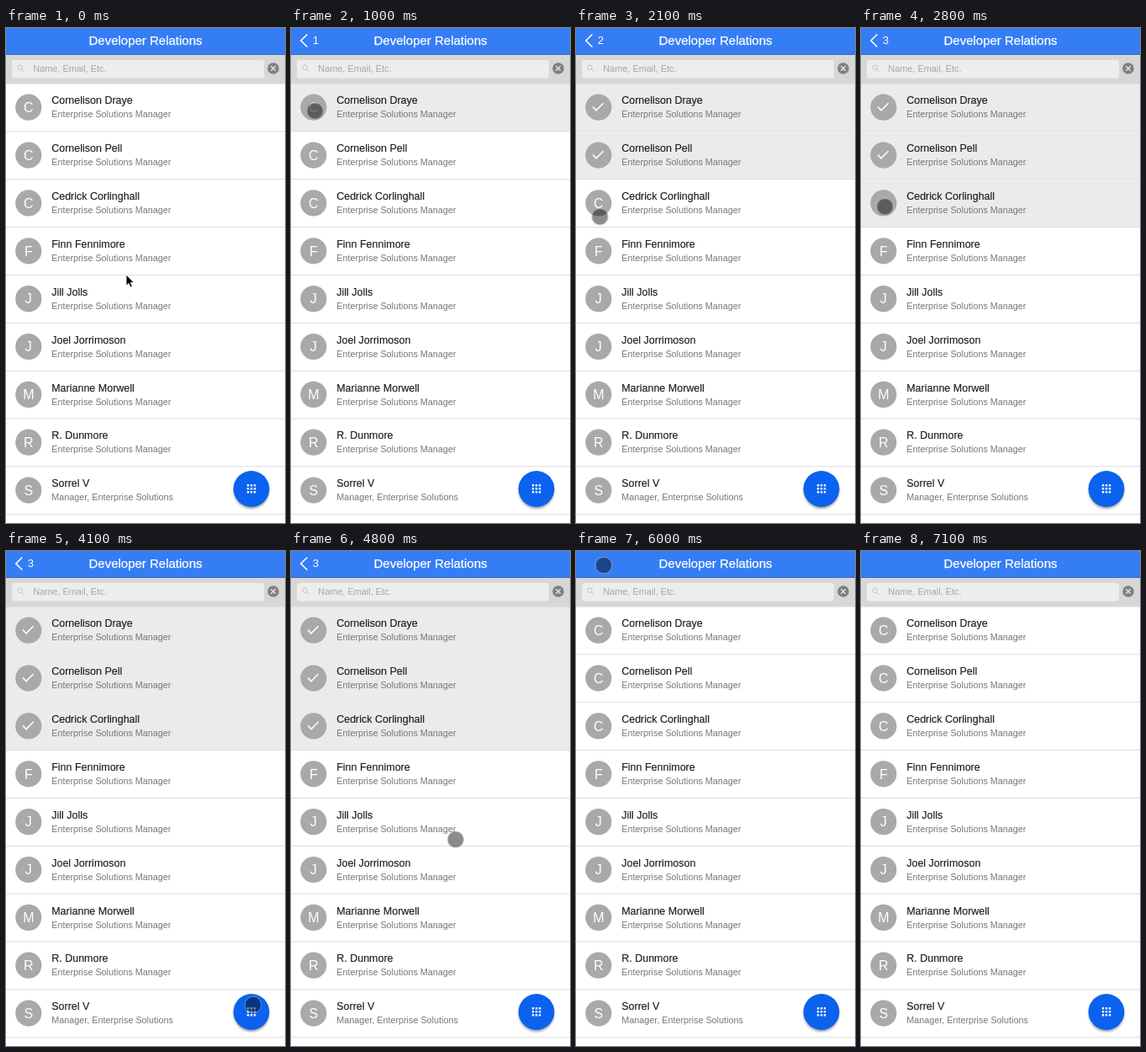
An HTML page for the animation above (7.5 s loop, 332 px wide and 588 px high).

```html
<!DOCTYPE html>
<html lang="en">
<head>
<meta charset="utf-8">
<title>Contact list</title>
<style>
  html, body { margin: 0; height: 100%; overflow: hidden; background: #fff; }
  svg { display: block; width: 100vw; height: 100vh; }
  text { font-family: "Liberation Sans", Arial, sans-serif; }
  .title { font-size: 15px; fill: #fff; stroke: #fff; stroke-width: .25; text-anchor: middle; }
  .count { font-size: 13px; fill: #fff; }
  .hint { font-size: 10.9px; fill: #a6a6a6; }
  .name { font-size: 12.5px; fill: #1c1c1c; stroke: #1c1c1c; stroke-width: .15; }
  .role { font-size: 10.8px; fill: #777; }
  .letter { font-size: 16px; fill: #fff; text-anchor: middle; }
  .line { fill: none; stroke: #fff; stroke-width: 1.6; }
  .picked, .check, .count, #back, #dot { opacity: 0; }
</style>
</head>
<body>
<svg viewBox="0 0 332 588">
  <defs>
    <filter id="soft" x="-30%" y="-30%" width="160%" height="160%">
      <feGaussianBlur stdDeviation="1.6"/>
    </filter>
  </defs>
  <rect width="332" height="588" fill="#fff"/>
  <g id="list"></g>

  <rect y="31" width="332" height="35.5" fill="#d7d7d7"/>
  <rect x="7" y="38" width="300" height="21.5" rx="3" fill="#ededed"/>
  <g fill="none" stroke="#c2c2c2">
    <circle cx="16.5" cy="46.8" r="2.7"/>
    <path d="M18.5 48.8l3 3"/>
  </g>
  <text class="hint" x="32.3" y="52.4">Name, Email, Etc.</text>
  <circle cx="318" cy="48" r="6.8" fill="#808080"/>
  <path d="M315.3 45.3l5.4 5.4m0-5.4l-5.4 5.4" stroke="#e8e8e8" stroke-width="1.3"/>

  <rect width="332" height="31" fill="#357df5"/>
  <rect y="31" width="332" height="1" fill="#3f69b0"/>
  <text class="title" x="166" y="20.3">Developer Relations</text>
  <path id="back" class="line" d="M19.4 7.5L11.8 15l7.6 7.5"/>
  <g id="counts"></g>

  <circle cx="292" cy="549.8" r="21" opacity=".4" filter="url(#soft)"/>
  <circle cx="292" cy="547.5" r="21.4" fill="#0b62ee"/>
  <g id="grid" fill="#fff"></g>

  <path id="arrow" d="M143 293v13.2l3-2.8 2 4.7 2.3-1-2-4.5h4z" stroke="#fff" stroke-width=".9"/>
  <g id="dot">
    <circle r="9.8" fill-opacity=".45"/>
    <circle r="9.8" fill="none" stroke="#fff" stroke-opacity=".35"/>
  </g>
</svg>
<script>
const LOOP = 7500, TICK = 100, PITCH = 56.86;
const REST = 300, RESET = 5700;
const $ = id => document.getElementById(id);
const all = name => document.querySelectorAll(name);

const names = ["Cornelison Draye", "Cornelison Pell", "Cedrick Corlinghall",
  "Finn Fennimore", "Jill Jolls", "Joel Jorrimoson", "Marianne Morwell",
  "R. Dunmore", "Sorrel V"];

$("list").innerHTML = names.map((name, i) => {
  const role = i < 8 ? "Enterprise Solutions Manager" : "Manager, Enterprise Solutions";
  return `<g transform="translate(0 ${66 + i * PITCH})">
    <rect class="picked" width="332" height="${PITCH}" fill="#ebebeb"/>
    <rect y="${PITCH - .5}" width="332" height="1" fill="#dcdcdc"/>
    <circle cx="26.8" cy="28.2" r="15.6" fill="#a9a9a9"/>
    <text class="letter" x="26.8" y="34">${name[0]}</text>
    <path class="check line" d="M20 27.6l4 4.2 8.6-8.6"/>
    <text class="name" x="54.2" y="24.4">${name}</text>
    <text class="role" x="54.2" y="40.4">${role}</text>
  </g>`;
}).join("");

$("grid").innerHTML = Array.from({ length: 9 }, (_, i) =>
  `<rect x="${286.8 + i % 3 * 4}" y="${542.1 + Math.floor(i / 3) * 4}" width="2.5" height="2.5" rx=".6"/>`).join("");

// Samples a function of time once per tick and holds each value.
function play(el, prop, valueAt) {
  const count = LOOP / TICK;
  const frames = Array.from({ length: count + 1 }, (_, i) => ({
    offset: i / count,
    [prop]: valueAt(Math.min(i, count - 1) * TICK),
    easing: "steps(1, end)"
  }));
  el.animate(frames, { duration: LOOP, iterations: Infinity });
}
const show = (el, from, to) => play(el, "opacity", t => +(t >= from && t < to));

const clamp = x => Math.max(0, Math.min(1, x));
const ramp = (t, from, length) => clamp((t - from) / length);
const smooth = x => x * x * (3 - 2 * x);

// Pointer stops; it rests at each one before travelling on.
const onRow = (at, row, dy = 0) => ({ at, x: 28.5, y: 98.5 + row * PITCH + dy });
const rows = [onRow(900, 0), onRow(1500, 1), onRow(2600, 2)];
const stops = [
  { at: 0, x: 147, y: 298 },
  rows[0], rows[1], onRow(2100, 2, 12), rows[2],
  { at: 4000, x: 294, y: 539 },
  { at: 5500, x: 33, y: 17 }
];

function pointer(t) {
  let { x, y } = stops[0];
  stops.slice(1).forEach((stop, i) => {
    const leave = stops[i].at + REST;
    const k = smooth(ramp(t, leave, stop.at - leave));
    x += (stop.x - x) * k;
    y += (stop.y - y) * k;
  });
  return `translate(${x}px, ${y}px)`;
}

$("counts").innerHTML = rows.map((_, i) =>
  `<text class="count" x="25.7" y="19.3">${i + 1}</text>`).join("");

rows.forEach(({ at }, i) => {
  show(all(".picked")[i], at, RESET);
  show(all(".count")[i], at, rows[i + 1]?.at ?? RESET);
  play(all(".letter")[i], "opacity", t => 1 - ramp(t, at, 200) + ramp(t, RESET, 200));
  play(all(".check")[i], "opacity", t => ramp(t, at + 200, 200) - ramp(t, RESET - TICK, 200));
});
show($("back"), rows[0].at, RESET);
show($("arrow"), 0, TICK);
play($("dot"), "opacity", t => t < TICK ? 0 : 1 - ramp(t, 6400, 200));
play($("dot"), "transform", pointer);
</script>
</body>
</html>
```
